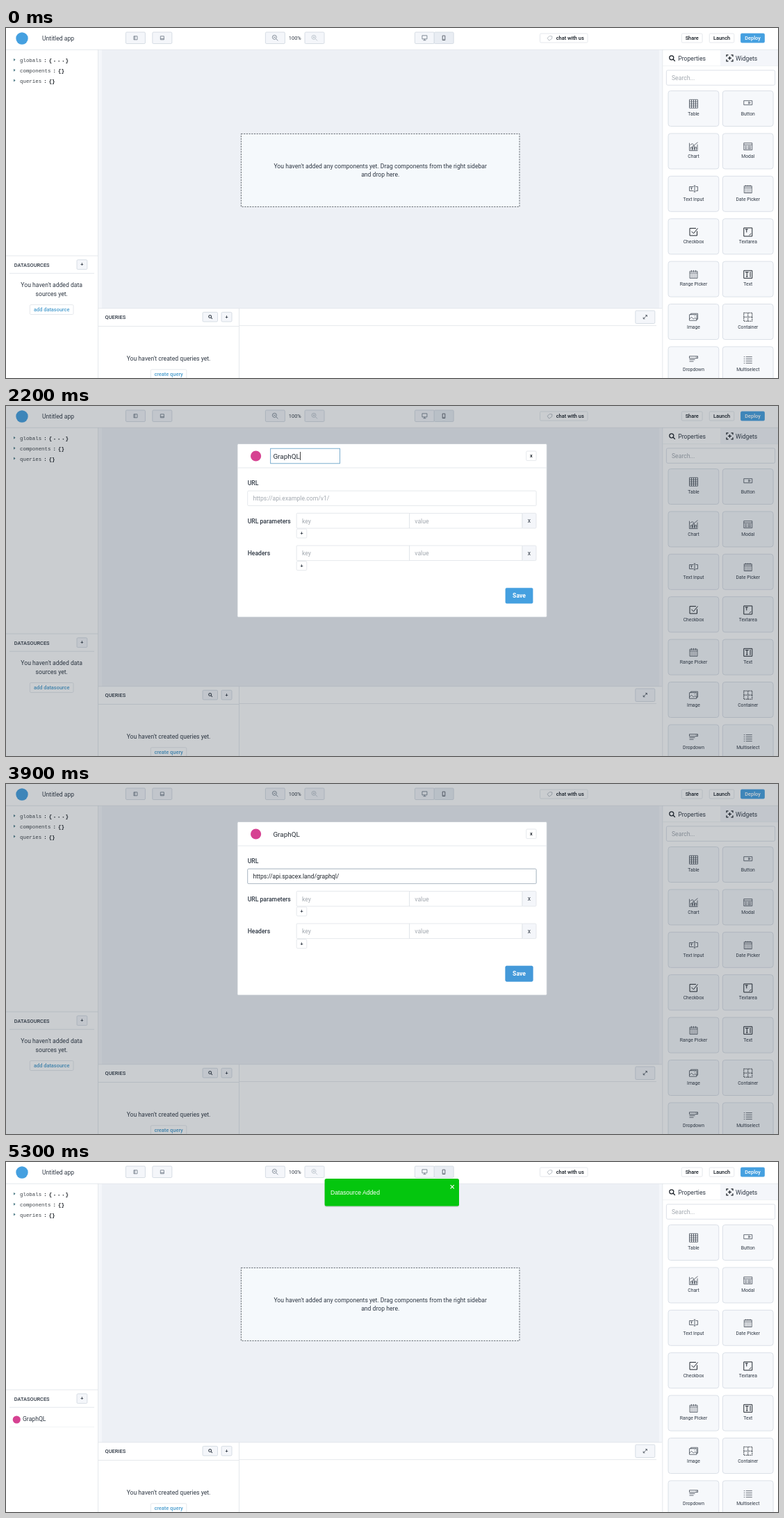
Recreate the animation shown at these times as an HTML page. Size 1111 by 504 pixels, loop 5400 ms.

```html
<!DOCTYPE html>
<html lang="en">
<head>
<meta charset="utf-8">
<title>Adding a datasource</title>
<style>
html, body { margin: 0; width: 100%; height: 100%; overflow: hidden; background: #fff; }
svg { display: block; width: 1111px; height: 504px; font-family: Roboto, sans-serif; }
text { white-space: pre; }
.icon { fill: none; stroke: #424a55; stroke-width: .8; }
.mono { font-family: "Liberation Mono", monospace; }
.toast { font-family: "Liberation Sans", sans-serif; }
</style>
</head>
<body>
<svg id="stage" viewBox="0 0 1111 504"></svg>
<script>
const INK = '#2f3844', MUTED = '#a3a9b0', LINE = '#dfe3e8', PALE = '#f4f6fa', BLUE = '#45a0e0', PINK = '#d64292';
const BODY = 8.64, SMALL = 7.41;

// Drawing helpers; every text is placed by its vertical centre.
const text = (x, y, str, { size = BODY, weight = 400, fill = INK, anchor = 'start', cls = '' } = {}) =>
  `<text x="${x}" y="${y + size * .36}" font-size="${size}" font-weight="${weight}" fill="${fill}" text-anchor="${anchor}" class="${cls}">${str}</text>`;
const mid = (x, y, str, opts) => text(x, y, str, { anchor: 'middle', ...opts });
const rect = (x, y, w, h, fill = '#fff', stroke = 'none', r = 0, extra = '') =>
  `<rect x="${x}" y="${y}" width="${w}" height="${h}" fill="${fill}" stroke="${stroke}" stroke-width=".8" rx="${r}" ${extra}/>`;
const line = (x1, y1, x2, y2, stroke = LINE) =>
  `<path d="M${x1} ${y1}L${x2} ${y2}" stroke="${stroke}" stroke-width=".8"/>`;
const dot = (x, y, r, fill) => `<circle cx="${x}" cy="${y}" r="${r}" fill="${fill}"/>`;
const square = (x, y, half, fill) => rect(x - half, y - half, half * 2, half * 2, fill);
const icon = (x, y, d, extra = '') => `<path class="icon" transform="translate(${x} ${y})" d="${d}" ${extra}/>`;
const button = (x, y, w, h, label, { fill = '#fff', stroke = LINE, color = INK, size = SMALL, weight = 500, r = 1.5 } = {}) =>
  rect(x, y, w, h, fill, stroke, r) + mid(x + w / 2, y + h / 2, label, { size, weight, fill: color });
const group = (id, content) => `<g id="${id}">${content}</g>`;
const box = (x, y, w, h) => `M${x} ${y}h${w}v${h}h${-w}z`;
const lens = 'M1.5 1.5L4 4M2 -1A3 3 0 1 1 -4 -1A3 3 0 1 1 2 -1';

function header() {
  const tool = (x, d, stroke = '#697482', w = 28) =>
    rect(x, 6, w, 16.5, PALE, '#cfd6df', 1.5) + icon(x + w / 2, 14.3, d, `style="stroke:${stroke}"`);
  return dot(23, 15, 8.7, BLUE) + text(52, 14.5, 'Untitled app') +
    tool(172.4, box(-2.5, -2.5, 5, 5) + 'M-1 -2.5v5') +
    tool(210.8, box(-2.5, -2.5, 5, 5) + 'M-2.5 1h5') +
    tool(373.4, lens + 'M-2.3 -1h2.8') + mid(415.8, 14.2, '100%', { size: SMALL }) +
    tool(430, lens + 'M-2.3 -1h2.8M-.9 -2.4v2.8', '#b3bbc5') +
    tool(588.4, box(-3.5, -3.5, 7, 5) + 'M-2 3.4h4M0 1.5v1.9') +
    rect(616.2, 6, 28, 16.5, '#e9edf3', '#cfd6df', 1.5) + icon(630, 14.3, box(-1.8, -3.2, 3.6, 6.4) + 'M-.6 2h1.2') +
    rect(768.5, 8, 68.5, 13, '#fff', LINE, 1.5) +
    icon(782.5, 14.5, 'M-3.5 0L0 -3L3.5 -2.5L3 1L-1 3.5Z', 'style="stroke:#a9b0b9"') +
    text(791.7, 14.3, 'chat with us', { size: SMALL, weight: 500, fill: '#111820' }) +
    button(972.3, 8, 29.8, 13, 'Share', { color: '#111820' }) +
    button(1012.3, 8, 35.5, 13, 'Launch', { color: '#111820' }) +
    button(1057.5, 8, 34, 13, 'Deploy', { fill: BLUE, stroke: BLUE, color: '#fff' }) +
    line(0, 31.3, 1111, 31.3);
}

function inspector() {
  const row = (y, name) => {
    const end = 20 + name.length * 4.45, bold = { size: SMALL, weight: 700, cls: 'mono', fill: '#1c2126' };
    const braces = name === 'globals'
      ? text(end + 10.5, y, '{', bold) + [70, 76.2, 82.4].map(x => dot(x, y + 1.5, .8, '#1c2126')).join('') + text(85.5, y, '}', bold)
      : text(end + 10.5, y, '{}', bold);
    return `<path d="M11 ${y - 2.6}l2.6 2l-2.6 2z" fill="#4d7b86"/>` +
      text(20, y, name, { size: SMALL, cls: 'mono', fill: '#3c4248' }) + text(end + 3, y, ':', bold) + braces;
  };
  return row(46.3, 'globals') + row(61.3, 'components') + row(76.2, 'queries') + line(132.5, 31, 132.5, 504);
}

function datasources() {
  const add = fill => fill
    ? button(34.4, 398.5, 62.6, 14, 'add datasource', { fill: BLUE, stroke: BLUE, color: '#fff' })
    : button(34.4, 398.5, 62.6, 14, 'add datasource', { color: '#4a9dce' });
  return line(0, 328, 132, 328) + text(11.8, 341, 'DATASOURCES', { size: SMALL, weight: 500 }) +
    button(102, 333.8, 14.8, 13.8, '+', { fill: PALE, stroke: '#cfd6df' }) + line(5, 353.3, 127, 353.3) +
    group('empty', mid(65.7, 370.3, "You haven't added data") + mid(65.7, 382.7, 'sources yet.') + add(false) + group('hover', add(true))) +
    group('added', dot(15.3, 371, 5.6, PINK) + text(24, 370.3, 'GraphQL') + line(5, 381.6, 127, 381.6, '#edf0f3'));
}

function workspace() {
  return rect(133, 31.7, 811.5, 372, PALE) + rect(138, 31.7, 802, 372, '#edf0f5') +
    rect(338.4, 152.4, 400.6, 105, '#f5f9fc', '#3d444c', 0, 'stroke-dasharray="2.2 1.5"') +
    mid(538.7, 199, "You haven't added any components yet. Drag components from the right sidebar") +
    mid(538.7, 211.3, 'and drop here.');
}

function queries() {
  return rect(133, 403.7, 811.5, 101) + line(133, 403.7, 944, 403.7) +
    text(142.6, 416.3, 'QUERIES', { size: SMALL, weight: 500 }) +
    rect(283, 409.3, 21.5, 13.6, PALE, '#cfd6df', 1.5) + icon(294.3, 416.2, lens, 'style="stroke-width:1.7" transform-origin="0 0"').replace('translate(294.3 416.2)', 'translate(294.3 416.2) scale(.65)') +
    button(310, 409.3, 15, 13.6, '+', { fill: PALE, stroke: '#cfd6df' }) +
    line(133, 429.5, 335, 429.5) + line(335.5, 404, 335.5, 504) + line(336, 428.6, 936, 428.6) +
    rect(905.8, 407, 28, 18.5, PALE, '#cfd6df', 1.5) +
    icon(919.8, 416.2, 'M-2.5 2.5L2.5 -2.5M.3 -2.6h2.3v2.3M-2.6 .3v2.3h2.3') +
    mid(234, 476, "You haven't created queries yet.") +
    button(208.3, 491.8, 51.5, 14, 'create query', { color: '#4a9dce' });
}

const calendar = box(-5.5, -4.5, 11, 10) + 'M-5.5 -2h11M-3 -6v2.5M0 -6v2.5M3 -6v2.5' +
  [0, 2, 4].map(y => `M-4 ${y}h1.2m1 0h1.2m1 0h1.2m1 0h1.2`).join('');
const widgets = [
  ['Table', box(-6, -6, 12, 12) + 'M-6 -3h12M-6 0h12M-6 3h12M-3 -6v12M0 -6v12M3 -6v12'],
  ['Button', box(-6, -4.5, 12, 6) + 'M1 -3l2.5 1.5l-2.5 1.5z'],
  ['Chart', 'M-6 -5v11h12M-4 5v-4h2v4M-1 5v-6h2v6M2 5v-4h2v4M5.5 5v-8M-5 -2l3 -2l3 2l5 -4'],
  ['Modal', box(-6, -5, 12, 10) + 'M-6 -2.5h12M-4.5 -.5h3m1 0h5M-4.5 1.5h3m1 0h5M-4.5 3.2h3m1 0h5'],
  ['Text Input', 'M0 -3.5h-6v6h6M3 -3.5h3v6h-3M1.5 -5v9M.2 -5h2.6M.2 4h2.6M-4.5 -1.8h3M-3 -1.8v3'],
  ['Date Picker', calendar],
  ['Checkbox', 'M5 -1v6.5h-10.5v-10.5h9M-3 -.5l3 3L6 -5'],
  ['Textarea', box(-6, -5.5, 12, 12) + 'M-4 -3.5h4M-2 -3.5v4.5M2 5l2.5 -2.5'],
  ['Range Picker', calendar],
  ['Text', box(-6, -5.5, 12, 11) + 'M-4 -3.2h5M-1.5 -3.2v6.5M-2.7 3.3h2.4M3.3 -4v8'],
  ['Image', 'M-4 -3v-2h10v8h-2' + box(-6, -3.5, 10.5, 8.5) + 'M-6 3l3 -3l3 3l2 -2l2.5 2.5M1 -1.5h1'],
  ['Container', box(-6, -6, 12, 12) + 'M0 -6v12M-6 0h12'],
  ['Dropdown', box(-6, -5, 12, 3) + 'M3.5 -4l.7 1l.7 -1M-6 0h8M-6 2.5h6'],
  ['Multiselect', 'M-3 -4h9M-3 -1h9M-3 2h9M-3 5h9M-6 -4h1.5M-6 -1h1.5M-6 2h1.5M-6 5h1.5'],
];

function sidebar() {
  const cards = widgets.map(([name, shape], i) => {
    const x = 953 + i % 2 * 78.3, y = 90.5 + (i >> 1) * 61.4, cx = x + 36.5;
    const bold = ['Checkbox', 'Textarea', 'Text', 'Container'].includes(name) ? 'style="stroke:#20262d;stroke-width:1"' : '';
    const dash = name === 'Container' ? ' stroke-dasharray="1.6 1"' : '';
    return rect(x, y, 72.8, 51, '#f6f8fb', '#d3dae2', 3.5) + icon(cx, y + 18.7, shape, bold + dash) +
      mid(cx, y + 32.8, name, { size: 6.79 });
  }).join('');
  return rect(945, 31.7, 166, 473) + line(944.8, 31, 944.8, 504) + rect(1028, 31.7, 83, 23, PALE) + line(945, 54.6, 1111, 54.6, '#edf0f3') +
    icon(958.8, 43.8, lens, 'style="stroke:#1f252c;stroke-width:1.3"') + text(967.3, 43.7, 'Properties') +
    icon(1041.5, 43.3, 'M-4.5 -2v-2.5h2.5M2 -4.5h2.5v2.5M4.5 2v2.5h-2.5M-2 4.5h-2.5v-2.5M-2.4 0h4.8M0 -2.4v4.8', 'style="stroke:#1f252c;stroke-width:1.3"') +
    text(1050, 43.7, 'Widgets') +
    rect(950.4, 60.9, 156.3, 21.4, '#fff', '#d3dae2', 2) + text(958, 71.8, 'Search...', { fill: MUTED }) + cards;
}

const restGear = (x, y) => Array.from({ length: 10 }, (_, i) =>
  `<path d="M0 -12.8v-2.2" stroke="#1b1f23" stroke-width="4" transform="translate(${x} ${y}) rotate(${i * 36})"/>`).join('') +
  `<circle cx="${x}" cy="${y}" r="12.6" fill="#fff" stroke="#1b1f23" stroke-width="1.3"/>` +
  mid(x, y, 'API', { size: 6.8, weight: 700 });

// Each entry: name, mark shape, half size, colour.
const databases = [
  ['PostgreSQL', dot, 15.5, '#336791'], ['MySQL', dot, 9, '#5d87a1'], ['Velm Server', dot, 12, '#c9545a'],
  ['MongoDB', dot, 10, '#5fa052'], ['Glowcrate', dot, 15.7, '#ffc40e'], ['TorvexDB', square, 14.5, '#2d72b6'],
  ['Elasticsearch', dot, 12.5, '#1fb8b0'], ['Redis', square, 14, '#c6302b'],
];
const apis = [
  ['Rest API', restGear], ['GraphQL', dot, 14.5, PINK], ['Plenko', square, 9, '#6772e5'],
  ['Mistgrid', square, 10.5, '#fcb400'], ['Wobbin Sheets', square, 14, '#23a566'], ['Murlo', dot, 15.5, '#36c0ea'],
];

const dialog = (x, w, h) => rect(x, 54.5, w, h, '#fff', '#c3c9d0', 1.5) + line(x, 89, x + w, 89) +
  button(x + w - 29.6, 65, 14.4, 13.6, 'x', { color: '#111820' });

function picker() {
  const cards = (items, top) => items.map(([name, mark, ...look], i) => {
    const x = 217.4 + i % 6 * 114.4, y = top + Math.floor(i / 6) * 87;
    return rect(x, y, 104.2, 76.6, '#fff', '#e3e7eb', 1.5) + mark(x + 52, y + 26, ...look) + mid(x + 52, y + 60.3, name);
  }).join('');
  return dialog(202.4, 706.2, 390) + text(217.2, 72, 'Add new datasource', { size: 9.88, weight: 500 }) +
    text(217.2, 111, 'DATABASES', { weight: 500 }) + cards(databases, 122) +
    text(217.2, 342, 'APIS', { weight: 500 }) + cards(apis, 352.8);
}

function form() {
  const pair = (y, label) => text(347.7, y + 11, label, { weight: 500 }) +
    rect(418.2, y, 162.4, 21.6, '#fff', LINE, 1) + rect(580.6, y, 162.4, 21.6, '#fff', LINE) +
    text(426, y + 11, 'key', { fill: MUTED }) + text(588.3, y + 11, 'value', { fill: MUTED }) +
    button(743, y, 20, 21.6, 'x', { fill: PALE, weight: 400, size: BODY }) +
    button(418.2, y + 22.6, 14.6, 13, '+');
  const caret = (id, x, y) => group(id, line(x, y - 6, x, y + 6, '#111'));
  return dialog(333, 445.3, 249.5) + dot(359.6, 72, 7.6, PINK) +
    group('titleFocus', rect(380.7, 61.2, 99.8, 21.6, '#fff', '#5b9ac2')) +
    text(384.4, 72, 'GraphQL', { size: 9.88, fill: '#232a32' }) + caret('titleCaret', 423.5, 72) +
    text(347.7, 111, 'URL', { weight: 500 }) + rect(347.7, 122.2, 415.4, 21.4, '#fff', LINE, 1.5) +
    group('urlFocus', rect(347.7, 122.2, 415.4, 21.4, '#fff', '#8496a8', 1.5)) +
    group('urlHint', text(355.5, 133, 'https://api.example.com/v1/', { fill: MUTED })) +
    group('url', text(355.5, 133, 'https://api.spacex.land/graphql/', { fill: '#20262d' })) +
    caret('hintCaret', 355.3, 133) + caret('urlCaret', 480.8, 133) +
    pair(154.4, 'URL parameters') + pair(201, 'Headers') +
    group('save', button(719, 262.3, 39, 21.8, 'Save', { fill: BLUE, stroke: BLUE, color: '#fff', size: BODY, weight: 700 })) +
    group('saveHover', button(719, 262.3, 39, 21.8, 'Save', { fill: '#4499d9', stroke: '#4499d9', color: '#fff', size: BODY, weight: 700 })) +
    group('saving', button(704, 262.3, 54.2, 21.8, 'Saving...', { fill: '#97c5ed', stroke: '#97c5ed', color: '#fff', size: BODY, weight: 700 }));
}

const toast = () => rect(458.6, 1, 193.4, 40, '#000', 'none', 2.5, 'opacity=".12"') + rect(458.6, 0, 193.4, 39.4, '#04c60e', 'none', 2.5) +
  text(467, 19.7, 'Datasource Added', { cls: 'toast', fill: '#fff' }) +
  icon(642.2, 11.7, 'M-2.6 -2.6L2.6 2.6M2.6 -2.6L-2.6 2.6', 'style="stroke:#fff;stroke-width:1.1"');

document.getElementById('stage').innerHTML =
  rect(0, 0, 1111, 504) + workspace() + queries() + inspector() + datasources() + sidebar() + header() +
  group('backdrop', rect(0, 0, 1111, 504, '#232e3c', 'none', 0, 'opacity=".24"')) +
  group('picker', picker()) + group('form', form()) + group('toast', toast());

const LOOP = 5400;
const parts = Object.fromEntries([...document.querySelectorAll('g[id]')].map(g => [g.id, g]));
const clamp = v => Math.min(1, Math.max(0, v));

// Parts visible between two moments of the loop.
const spans = {
  backdrop: [1200, 4900], picker: [1200, 2100], form: [2100, 4900], empty: [0, 5200], added: [5200, LOOP],
  titleFocus: [2200, 3100], titleCaret: [2200, 2800], hintCaret: [3100, 3400], urlCaret: [3400, 3800],
  urlHint: [0, 3400], url: [3400, LOOP], save: [0, 4700], saveHover: [3800, 4700], saving: [4700, LOOP], toast: [4800, LOOP],
};

function draw(now) {
  const t = now % LOOP;
  for (const [id, [from, to]] of Object.entries(spans))
    parts[id].style.display = t >= from && t < to ? '' : 'none';
  parts.hover.style.opacity = t < 500 ? 0 : t < 1200 ? 1 : .3 * clamp((1400 - t) / 200);
  parts.urlFocus.style.opacity = t < 3100 ? 0 : clamp((4100 - t) / 250);
  const left = 1 - clamp((t - 4800) / 400);
  parts.toast.setAttribute('transform', `translate(0 ${24 - 1815 * left ** 3})`);
}

function tick() {
  draw(performance.now());
  requestAnimationFrame(tick);
}
tick();
</script>
</body>
</html>
```
